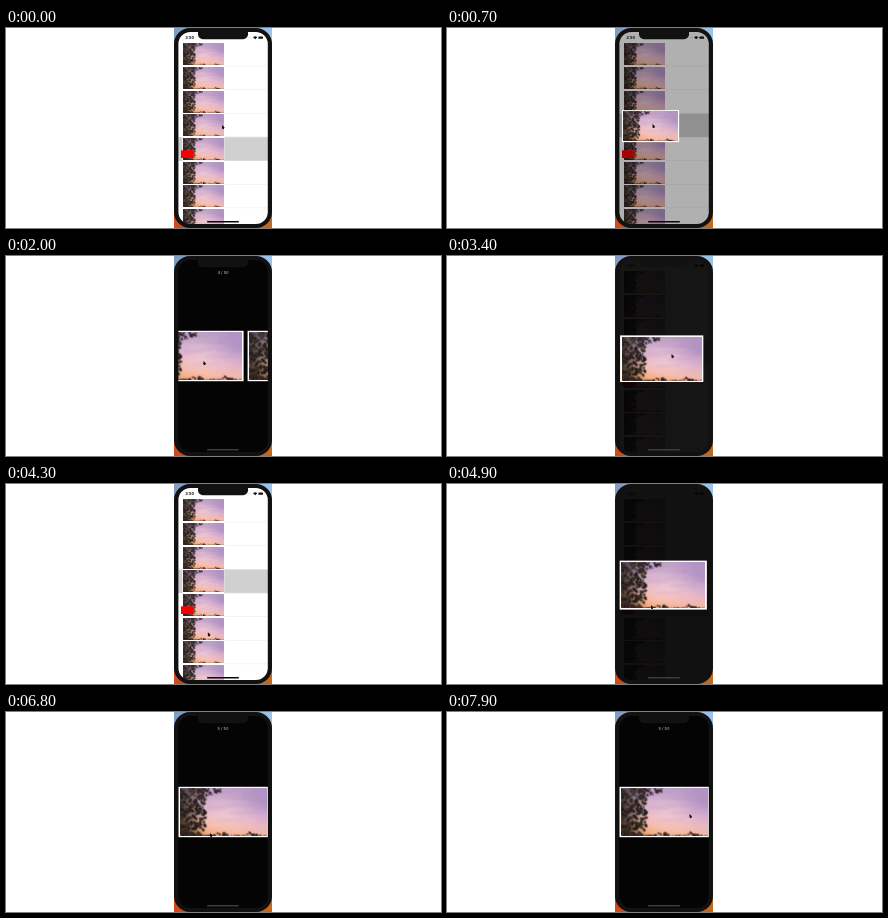
An HTML page with a canvas that plays this animation: 435x200 px, repeating every 8000 ms.

```html
<!DOCTYPE html>
<html lang="en">
<head>
<meta charset="utf-8">
<title>Photo list and viewer</title>
<style>
  html, body { margin: 0; width: 100%; height: 100%; overflow: hidden; background: #fff; }
  canvas { display: block; width: 435px; height: 200px; }
</style>
</head>
<body>
<canvas id="stage"></canvas>
<script>
const LOOP = 8000, ROWS = 8, PITCH = 23.65, ZOOM = 350;
const canvas = document.getElementById('stage');
const ctx = canvas.getContext('2d');
const dpr = window.devicePixelRatio || 1;
canvas.width = 435 * dpr;
canvas.height = 200 * dpr;

let seed = 11;
const rand = () => (seed = (seed * 16807) % 2147483647) / 2147483647;
const mix = (a, b, k) => a + (b - a) * k;

// Eased step from 0 to 1
function ramp(t, start, length) {
  const k = Math.min(1, Math.max(0, (t - start) / length));
  return k * k * (3 - 2 * k);
}

function fade(g, ...colors) {
  colors.forEach((color, i) => g.addColorStop(i / (colors.length - 1), color));
  return g;
}

// Sunset behind a tree
function paintSunset() {
  const pic = document.createElement('canvas');
  const W = pic.width = 360, H = pic.height = 200;
  const c = pic.getContext('2d');
  const fill = style => {
    c.fillStyle = style;
    c.fillRect(0, 0, W, H);
  };
  const leaf = (x, y, size, color) => {
    c.fillStyle = color;
    c.beginPath();
    c.ellipse(x, y, size, size * 0.7, rand() * 3, 0, 7);
    c.fill();
  };

  fill(fade(c.createLinearGradient(40, 0, 0, H),
    '#b294c4', '#c8a4cd', '#dcb0cc', '#eab8c0', '#f4b8a4', '#f2a878', '#c07a58'));
  fill(fade(c.createRadialGradient(190, 95, 10, 190, 95, 150),
    'rgba(255,225,225,.4)', 'rgba(255,215,220,.2)', 'rgba(255,210,215,0)'));

  c.filter = 'blur(6px)';
  for (let i = 0; i < 14; i++) {
    c.fillStyle = i % 2 ? 'rgba(255,220,215,.2)' : 'rgba(150,115,175,.15)';
    c.fillRect(90 + rand() * 200, 25 + rand() * 130, 110, 7);
  }

  c.filter = 'blur(2px)';
  fill(fade(c.createLinearGradient(0, 0, 105, 0), 'rgba(44,36,30,.9)', 'rgba(44,36,30,0)'));
  for (let i = 0; i < 190; i++) {
    leaf(rand() ** 1.4 * 105, rand() * H, 4 + rand() * 6, i % 2 ? '#241c1a' : '#383024');
  }
  for (let i = 0; i < 55; i++) {
    const k = rand();
    leaf(60 + k * 110, rand() * (55 - k * 40), 3 + rand() * 4, '#33272a');
  }
  // Low bushes along the horizon
  for (let i = 0; i < 90; i++) {
    const x = rand() * W, clump = Math.max(0, Math.cos((x - 172) / 20));
    leaf(x, H - rand() * 14 * clump, 3 + 3 * clump, '#3c2424');
  }
  return pic;
}
const sunset = paintSunset();

function rect(x, y, w, h, color) {
  ctx.fillStyle = color;
  ctx.fillRect(x, y, w, h);
}

function round(x, y, w, h, r, color) {
  ctx.beginPath();
  ctx.roundRect(x, y, w, h, r);
  if (color) {
    ctx.fillStyle = color;
    ctx.fill();
  }
}

function label(text, x, y, color, weight) {
  ctx.fillStyle = color;
  ctx.font = `${weight} 4px Inter, Arial, sans-serif`;
  ctx.textAlign = 'center';
  ctx.fillText(text, x, y);
}

function photo(cx, cy, w, h) {
  const edge = w * 0.018;
  rect(cx - w / 2, cy - h / 2, w, h, '#fff');
  ctx.drawImage(sunset, cx - w / 2 + edge, cy - h / 2 + edge, w - 2 * edge, h - 2 * edge);
}

const thumb = i => ({ x: 197.3, y: 26.35 + i * PITCH, w: 42, h: 23.5 });

function drawStatus() {
  label('3:50', 183.7, 11.2, '#111', 700);
  for (let i = 0; i < 4; i++) rect(242.6 + i, 9.6, 0.5, 0.6, '#999');
  ctx.fillStyle = '#111';
  ctx.beginPath();
  ctx.moveTo(249.2, 11.2);
  ctx.arc(249.2, 11.2, 2.8, -Math.PI * 0.77, -Math.PI * 0.23);
  ctx.fill();
  round(252.4, 8.4, 4.6, 2.4, 0.6, '#111');
}

function drawList(selected, hidden) {
  rect(168, 0, 98, 200, '#fff');
  for (let i = 0; i < ROWS; i++) {
    const { x, y, w, h } = thumb(i);
    if (i === selected) rect(172, y - h / 2, 90, PITCH, '#d0d0d0');
    rect(218.5, y + h / 2 - 0.3, 43.5, 0.4, '#e2e2e2');
    if (i !== hidden) photo(x, y, w, h);
  }
  rect(175, 122.3, 12.3, 7.7, '#f90000');
  drawStatus();
}

function drawBezel() {
  ctx.beginPath();
  ctx.roundRect(168, 0, 98, 200, 16);
  ctx.roundRect(172.4, 4, 89.4, 192, 12);
  ctx.fillStyle = '#111';
  ctx.fill('evenodd');
  round(192, 2, 50, 9.2, [0, 0, 5, 5], '#111');
}

function drawWallpaper() {
  rect(168, 0, 98, 100, fade(ctx.createLinearGradient(168, 0, 266, 0), '#7f9dc0', '#9cc4ea'));
  rect(168, 100, 98, 100, fade(ctx.createLinearGradient(168, 0, 266, 0), '#cf4a1c', '#c4691e'));
}

function drawCursor(x, y) {
  ctx.fillStyle = '#0b0b0b';
  ctx.beginPath();
  ctx.moveTo(x, y);
  ctx.lineTo(x, y + 3.6);
  ctx.lineTo(x + 1.5, y + 4.2);
  ctx.lineTo(x + 2.6, y + 2.5);
  ctx.fill();
}

// The pointer eases from stop to stop: arrival time, x, y
const stops = [[450, 205.5, 96], [1600, 222, 105], [3400, 224.5, 98],
  [4200, 201.5, 153.5], [4600, 204, 121], [7800, 242.5, 102]];
function cursorAt(t) {
  let x = 216, y = 97;
  for (const [end, toX, toY] of stops) {
    const k = ramp(t, end - 400, 400);
    x = mix(x, toX, k);
    y = mix(y, toY, k);
  }
  return [x, y];
}

function draw(t) {
  const row = t < 4000 ? 3 : 4;
  const selected = t >= 450 && t < 4550 ? 3 : 4;
  const open = ramp(t, 570, ZOOM) - ramp(t, 3500, ZOOM) + ramp(t, 4600, ZOOM);
  const pull = ramp(t, 3000, 400) * (1 - ramp(t, 3500, ZOOM));
  const slide = 26 * (ramp(t, 2150, ZOOM) - ramp(t, 1700, ZOOM));

  ctx.setTransform(dpr, 0, 0, dpr, 0, 0);
  ctx.imageSmoothingQuality = 'high';
  rect(0, 0, 435, 200, '#fff');
  drawWallpaper();

  ctx.save();
  round(171, 3, 92, 194, 13);
  ctx.clip();
  drawList(selected, open > 0 ? row : -1);
  rect(168, 0, 98, 200, `rgba(4,4,4,${open * (1 - 0.07 * pull)})`);
  if (open > 0) {
    const from = thumb(row), scale = 1 - 0.075 * pull;
    const x = mix(from.x, 217.2 - 2.5 * pull + slide, open);
    const y = mix(from.y, 100 + 2.7 * pull, open);
    const w = mix(from.w, 90 * scale, open), h = mix(from.h, 50.4 * scale, open);
    photo(x, y, w, h);
    if (slide) photo(x + 94, y, w, h);
  }
  if (open === 1 && pull < 0.1) label(`${row + 1} / 50`, 217, 18.2, '#ccc', 400);
  round(201, 193.1, 32, 1.3, 0.65, open > 0.6 ? '#3c3c3c' : '#080808');
  ctx.restore();

  drawBezel();
  const [x, y] = cursorAt(t);
  drawCursor(x + slide, y);
}

const start = performance.now();
function tick(now) {
  draw(Math.max(0, now - start) % LOOP);
  requestAnimationFrame(tick);
}
draw(0);
requestAnimationFrame(tick);
</script>
</body>
</html>
```
